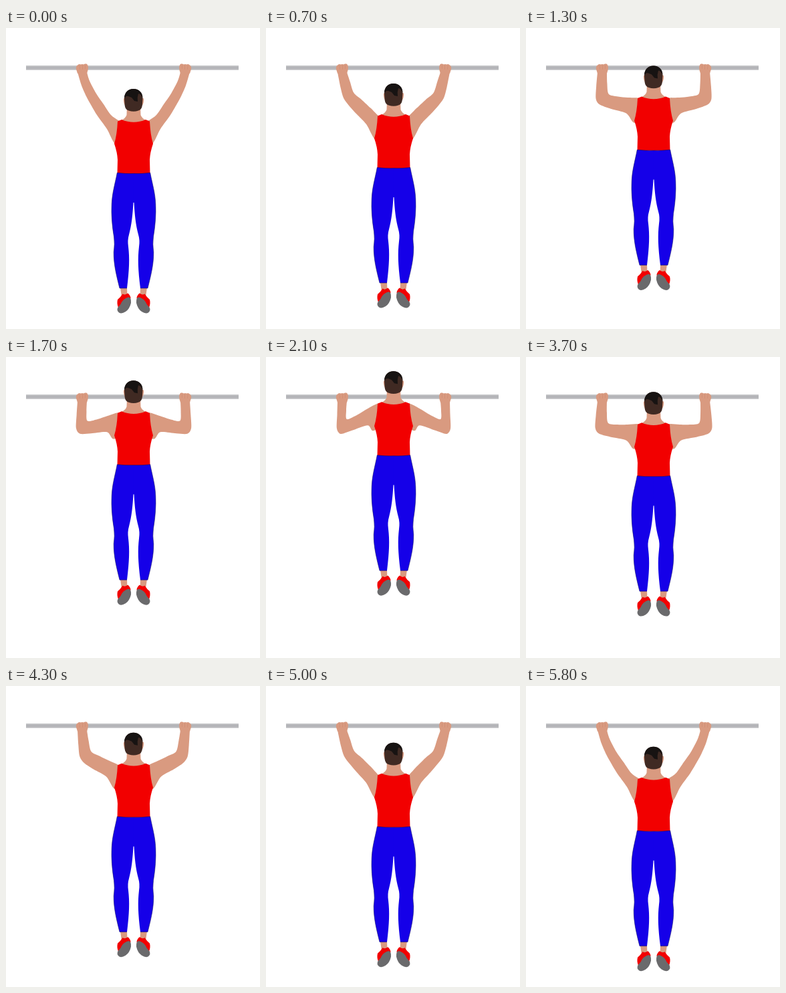
Animation, 380 px wide and 450 px high, one loop 5.9 s. Source, as an HTML page with a canvas:

```html
<!DOCTYPE html>
<html lang="en">
<head>
<meta charset="utf-8">
<title>Pull-up</title>
<style>
html, body { margin: 0; width: 100%; height: 100%; overflow: hidden; background: #fff; }
canvas { display: block; width: 380px; height: 450px; }
</style>
</head>
<body>
<canvas id="stage"></canvas>
<script>
const W = 380, H = 450, LOOP = 5900, STEP = 100, AXIS = 191;
const SKIN = '#d99a80', RED = '#f20000', BLUE = '#1500e8', GREY = '#6a6a6c';

const canvas = document.getElementById('stage');
const ratio = window.devicePixelRatio || 1;
canvas.width = W * ratio;
canvas.height = H * ratio;
const ctx = canvas.getContext('2d');

// Height of the body above the hanging pose, one value per 600 ms.
const LIFT = [0, 5, 29.5, 60, 74, 62, 42, 24, 9.6, 1.8, 0];

// Left arm outline from the outer wrist round to the inner wrist, by lift.
const ARM = [
  { lift: 0, pts: [113,86, 120,102, 126,113, 136,130, 151,151, 163,173,
                   168,138, 157,130, 146,114, 135,98, 125,79] },
  { lift: 6, pts: [112,89, 117,105, 125,116, 136,129, 150,145, 163,168,
                   168,133, 157,121, 144,108, 132,97, 126,80] },
  { lift: 37, pts: [104.5,87, 103.5,106, 109,114.5, 126,120, 150,126, 161,139,
                    167,102, 152,102.5, 137,102, 123,99, 121,83] },
  { lift: 70, pts: [106.5,86, 106,107, 112,115, 128,110, 152,102, 160,110,
                    168,69, 152,77, 137,86, 121,93, 120,80] }
];

const SHAPES = {
  hand: new Path2D('M107 68 L104.8 61 Q104.5 57 107 55.5 Q109 53 112 54.5 Q114 53.5 116 54.5 Q118 53 120 53.5 Q122.5 54 123 59 Q123 63 121 68 Z'),
  fingers: new Path2D('M110 56 L110.5 62 M114.5 55.5 L114.5 62 M118.5 55.5 L118.5 61'),
  neck: new Path2D('M181 116 L180.5 130 Q179 135 172 138 L176 145 L206 145 L210 138 Q203 135 201.5 130 L201 116 Z'),
  ear: new Path2D('M178 105 Q175.5 104 176 109 Q176.5 115 179 116 Z'),
  head: new Path2D('M190.7 91 C199 91 204.5 97 204.5 105 L203.8 116 Q203 122 198 123.5 Q191 126 183.5 123.5 Q178.5 122 177.7 116 L177 105 C177 97 182.5 91 190.7 91 Z'),
  hair: new Path2D('M190.7 91 C199 91 204.5 97 204.3 104 Q202 99 198 98 Q196 104 197 110 L192 109 L188 104 L183 102 Q179 101 177.2 105 C177 97 182.5 91 190.7 91 Z'),
  shirt: new Path2D('M167 139.5 L173 137 Q191 144.5 209 137 L215 139.5 Q216 160 220 173 Q215.5 186 215 197 L215.5 218 L166.5 218 L167 197 Q166.5 186 162 173 Q166 160 167 139.5 Z'),
  leg: new Path2D('M166.3 216.5 Q178 218 191.3 217.5 L191.3 261 L190.5 261 C189.5 279 188 294 184 309 Q181.5 317 183 327 C185 344 184.5 361 181 389 L170 389 C165 369 161 353 161.2 335 Q163 323 161.5 312 C158.5 294 157.5 279 158.2 263 C159 246 162.5 236 166.3 216.5 Z'),
  edge: new Path2D('M181 389 L170 389 C165 369 161 353 161.2 335 Q163 323 161.5 312 C158.5 294 157.5 279 158.2 263 C159 246 162.5 236 166.3 216.5 Q178 218 191 217.5'),
  ankle: new Path2D('M171 388 L181 388 L181.5 402 L173 402 Z'),
  shoe: new Path2D('M174.5 397.5 Q178 400 182 396.5 Q185 398 186.5 403 L184 416 L168 418 Q165.5 412 167 406 Q171 403 174.5 397.5 Z'),
  sole: new Path2D('M184 402.5 Q187.5 403 187 411 Q185 420 179 424 Q173 428 169 425.5 Q165 422 167.5 417.5 Q171.5 414 173.5 409 Q178 403 184 402.5 Z')
};

function liftAt(t) {
  const i = Math.min(Math.floor(t / 600), LIFT.length - 2);
  const u = t / 600 - i;
  const at = k => LIFT[Math.max(0, Math.min(LIFT.length - 1, k))];
  const a = at(i), b = at(i + 1);
  const m = (b - at(i - 1)) / 2, n = (at(i + 2) - a) / 2;
  const u2 = u * u, u3 = u2 * u;
  return a * (2 * u3 - 3 * u2 + 1) + m * (u3 - 2 * u2 + u) +
         b * (3 * u2 - 2 * u3) + n * (u3 - u2);
}

function armPoints(lift) {
  let i = 0;
  while (i < ARM.length - 2 && lift > ARM[i + 1].lift) i++;
  const a = ARM[i], b = ARM[i + 1];
  const u = (lift - a.lift) / (b.lift - a.lift);
  const pts = [[107, 66]];
  for (let k = 0; k < a.pts.length; k += 2) {
    const mix = j => a.pts[j] + (b.pts[j] - a.pts[j]) * u;
    if (k === 12) pts.push([176, 170 - lift], [176, 143 - lift]);
    pts.push([mix(k), mix(k + 1)]);
  }
  pts.push([121, 66]);
  return pts;
}

function smooth(pts) {
  const path = new Path2D(), n = pts.length, s = 0.14;
  path.moveTo(...pts[0]);
  for (let i = 0; i < n - 1; i++) {
    const p = pts[Math.max(0, i - 1)], a = pts[i], b = pts[i + 1], q = pts[Math.min(n - 1, i + 2)];
    path.bezierCurveTo(a[0] + (b[0] - p[0]) * s, a[1] + (b[1] - p[1]) * s,
                       b[0] - (q[0] - a[0]) * s, b[1] - (q[1] - a[1]) * s, b[0], b[1]);
  }
  path.closePath();
  return path;
}

function fill(path, color) {
  ctx.fillStyle = color;
  ctx.fill(path);
}

function line(path, color, width) {
  ctx.strokeStyle = color;
  ctx.lineWidth = width;
  ctx.stroke(path);
}

function bothSides(draw) {
  draw();
  ctx.save();
  ctx.translate(2 * AXIS, 0);
  ctx.scale(-1, 1);
  draw();
  ctx.restore();
}

function drawBar() {
  ctx.fillStyle = '#c9cacc';
  ctx.fillRect(30, 56, 318, 7);
  ctx.fillStyle = '#b3b4b8';
  ctx.fillRect(30, 57.5, 318, 4);
}

function drawBody() {
  fill(SHAPES.neck, SKIN);
  bothSides(() => fill(SHAPES.ear, SKIN));
  fill(SHAPES.head, '#402a23');
  fill(SHAPES.hair, '#171312');
  fill(SHAPES.shirt, RED);
  bothSides(() => {
    fill(SHAPES.ankle, SKIN);
    fill(SHAPES.shoe, RED);
    fill(SHAPES.sole, GREY);
    fill(SHAPES.leg, BLUE);
    line(SHAPES.edge, '#14106a', 0.6);
  });
}

function draw(t) {
  const lift = liftAt(t);
  const arm = smooth(armPoints(lift));
  ctx.setTransform(ratio, 0, 0, ratio, 0, 0);
  ctx.fillStyle = '#fff';
  ctx.fillRect(0, 0, W, H);
  drawBar();
  bothSides(() => {
    fill(arm, SKIN);
    fill(SHAPES.hand, SKIN);
    line(SHAPES.fingers, '#cb8a70', 0.6);
  });
  ctx.save();
  ctx.translate(0, -lift);
  drawBody();
  ctx.restore();
}

const start = performance.now();
function frame() {
  const t = (performance.now() - start) % LOOP;
  draw(Math.floor(t / STEP) * STEP);
  requestAnimationFrame(frame);
}
frame();
</script>
</body>
</html>
```
